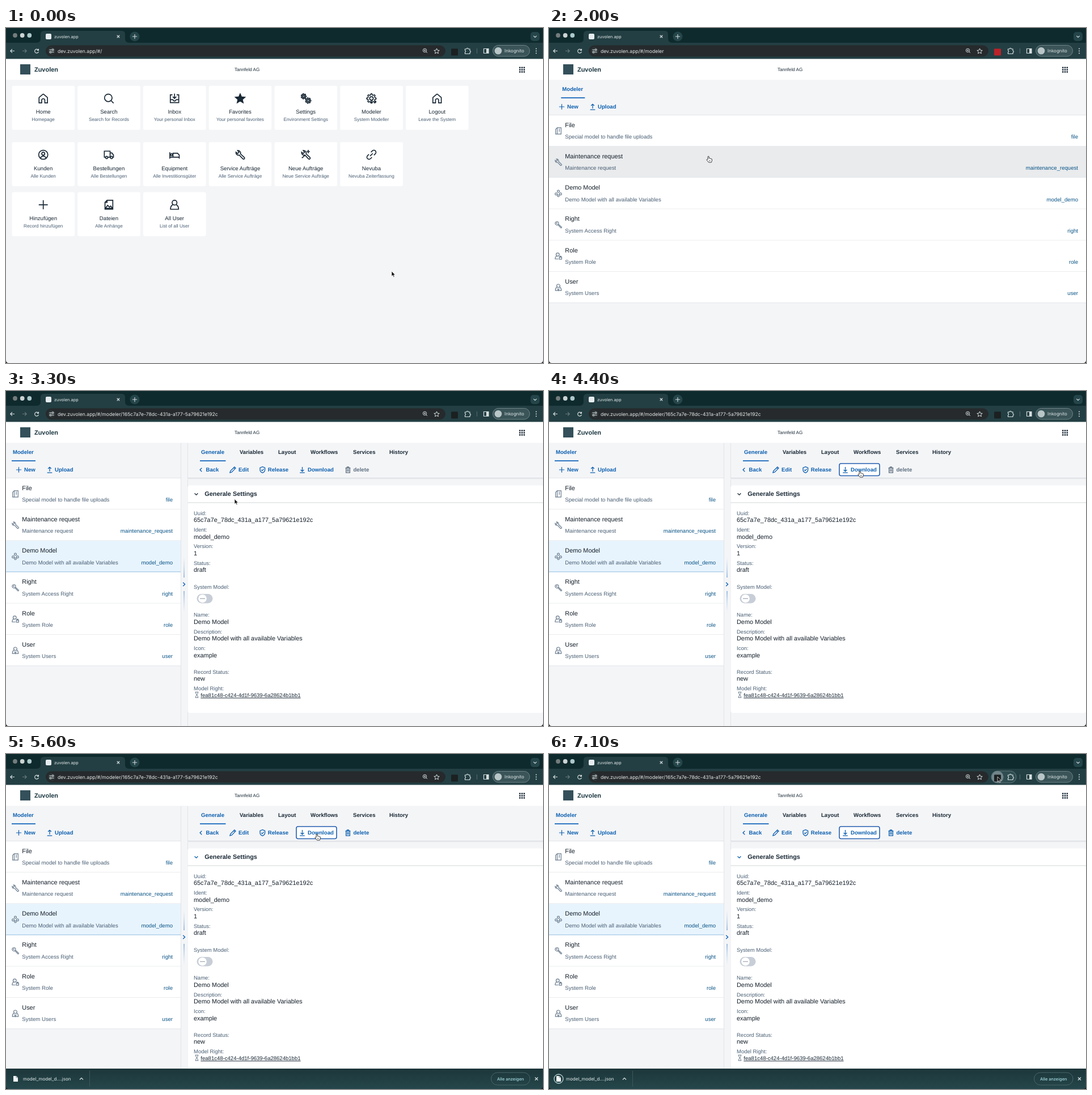
These frames come from a looping animation (947x591 px, 7200 ms). An HTML page:

```html
<!DOCTYPE html>
<html lang="de">
<head>
<meta charset="utf-8">
<title>Modeler</title>
<style>
html, body { margin: 0; width: 100%; height: 100%; overflow: hidden; background: #f4f5f7; }
svg { display: block; width: 100%; height: 100%; }
text { font-family: "Liberation Sans", Arial, sans-serif; text-rendering: geometricPrecision; white-space: pre; }
.ui { font-family: Inter, sans-serif; }
</style>
</head>
<body>
<svg id="stage" viewBox="0 0 947 591" preserveAspectRatio="none"></svg>
<script>
const LOOP = 7200, STEP = 100;
const INK = '#1a2936', BLUE = '#0d60b0', LINK = '#0a5486', GREY = '#4a5f74', PAGE = '#f4f5f7';
const stage = document.getElementById('stage');

// Drawing helpers
const rect = (x, y, w, h, fill, extra = '') =>
  `<rect x="${x}" y="${y}" width="${w}" height="${h}" fill="${fill}" ${extra}/>`;
const disc = (x, y, r, fill, extra = '') => `<circle cx="${x}" cy="${y}" r="${r}" fill="${fill}" ${extra}/>`;
const text = (s, x, y, size = 9.6, fill = INK, extra = '') =>
  `<text x="${x}" y="${y}" font-size="${size}" fill="${fill}" ${extra}>${s}</text>`;
const bold = (s, x, y, size = 9.6, fill = BLUE) => text(s, x, y, size, fill, 'font-weight="700"');
const ui = (s, x, y, size, fill, extra = '') => text(s, x, y, size, fill, 'class="ui" ' + extra);
const line = (d, color, width = 1.2, extra = '') =>
  `<path d="${d}" fill="none" stroke="${color}" stroke-width="${width}" stroke-linejoin="round" ${extra}/>`;
const ring = (x, y, r) => `M${x - r} ${y}a${r} ${r} 0 1 0 ${2 * r} 0a${r} ${r} 0 1 0 ${-2 * r} 0`;
const cog = (x, y, r, teeth) => {
  let d = ring(x, y, r * .38);
  for (let i = 0; i <= teeth * 4; i++) {
    const a = (i - .5) / teeth / 4 * Math.PI * 2, q = i % 4 < 2 ? r : r * .76;
    d += `${i ? 'L' : 'M'}${(x + q * Math.cos(a)).toFixed(2)} ${(y + q * Math.sin(a)).toFixed(2)}`;
  }
  return d;
};

// Icon outlines, centred on 0,0
const WRENCH = 'M-7-4.2A4.3 4.3 0 0 0-1.5.5L4.5 6.9A1.7 1.7 0 0 0 6.9 4.5L.5-1.5A4.3 4.3 0 0 0-4.2-7L-2-4.2-4.2-2Z';
const ICONS = {
  home: 'M-7-1.2Q-7-1.7-6.5-2.1L-.6-7Q0-7.5.6-7L6.5-2.1Q7-1.7 7-1.2V7.3H2.6V3A2.6 2.6 0 0 0-2.6 3V7.3H-7Z',
  search: ring(-1, -1, 6.3) + 'M3.5 3.5 7.8 7.8',
  inbox: 'M-3.5-6H-7V7H7V-6H3.5M-7 2H-3L-1 4H1L3 2H7M0-8V0M-3-3 0 0 3-3',
  star: 'M0-7.5 2.2-2.5 7.8-2 3.6 1.6 4.8 7 0 4.1-4.8 7-3.6 1.6-7.8-2-2.2-2.5Z',
  cogs: cog(-3.5, -3.5, 4.3, 7) + cog(4, 3.5, 4.6, 7),
  cog: cog(0, 0, 7.8, 8) + 'M1.5 3-1 5.5 1.5 8M5 3 7.5 5.5 5 8',
  account: ring(0, 0, 7.6) + ring(0, -1.8, 2.5) + 'M-4.5 6A4.6 4.6 0 0 1 4.5 6',
  truck: 'M-5.6 4H-7.6V-6H2V4H-1.8M2-3H5L7.6.5V4H6.4M2 4H2.4' + ring(-3.7, 4.6, 1.9) + ring(4.4, 4.6, 1.9),
  bed: 'M-7.8-4V6.5M-7.8 4H7.8V6.5M7.8 4V.5L5-2.5H-2.5V4' + ring(-5, 0, 1.7),
  wrench: WRENCH,
  repair: WRENCH + 'M-6.5 5.5-1.5 1M4-8V-2.5M1.3-5.3H6.8',
  link: 'M-2.2 2.2 2.2-2.2M-.8-4.2 1.6-6.5A3.4 3.4 0 0 1 6.5-1.6L4.2.8M.8 4.2-1.6 6.5A3.4 3.4 0 0 1-6.5 1.6L-4.2-.8',
  plus: 'M0-7.5V7.5M-7.5 0H7.5',
  image: 'M-3-7.5H6.5V7.5H-6.5V-4ZM-3-7.5V-4H-6.5M-6 6-2 1 1 4 3 2 6 6Z',
  user: ring(0, -3.4, 4) + 'M-3 0Q-6.7 2-6.7 7.5H6.7Q6.7 2 3 0',
  file: 'M-2.5-7H6V7H-6V-3.5ZM-2.5-7V7M2-5V2',
  model: ring(0, -4.8, 2.4) + ring(-4.8, 1, 2.4) + ring(4.8, 1, 2.4) + ring(0, 5.2, 2.1),
  key: ring(-3.2, -3.2, 3.8) + ring(-3.6, -3.6, .7) + 'M-1 .3 6 7.2 7.5 5.5.3-1',
  role: ring(-1.5, -3.3, 3.5) + 'M0 6.5H-7Q-7 1-3.5 0M2 2.5H7.3V7H2ZM3.2 2.5V.5H6V2.5',
  person: ring(0, -3.3, 3.6) + 'M-3-.5Q-6.5 1-6.5 7H6.5Q6.5 1 3-.5M-2 2 0 7 2 2',
  upload: 'M0 4V-6.5M-4-2.7 0-6.5 4-2.7M-6 7H6',
  download: 'M0-7V4M-4 0 0 4 4 0M-6 7H6',
  left: 'M2.5-4.5-2 0 2.5 4.5',
  down: 'M-4.5-2 0 2.5 4.5-2',
  pencil: 'M-7 7-5.8 2.8 4-7 7-4-2.8 5.8ZM2-5 5-2',
  shield: 'M0-7.5 6-5V0Q6 5 0 7.5-6 5-6 0V-5ZM-3 0-.6 2.3 3.4-2.2',
  trash: 'M-6-4.5H6M-2-4.5V-7H2V-4.5M-4.7-4.5V7H4.7V-4.5M-1.6-2V4.5M1.6-2V4.5',
  hourglass: 'M-4-7H4M-4 7H4M-3-7Q-3-3 0 0 3-3 3-7M-3 7Q-3 3 0 0 3 3 3 7',
  cross: 'M-3-3 3 3M3-3-3 3',
  reload: 'M4.5-2A5 5 0 1 0 5 1.5M5-5.5V-1.6H1'
};
const icon = (name, x, y, scale = 1, color = INK, width = 1.5) =>
  `<g transform="translate(${x} ${y}) scale(${scale})">` +
  `<path d="${ICONS[name]}" fill="${name === 'star' ? color : 'none'}" stroke="${color}" stroke-width="${width}"/></g>`;

const CARDS = [
  [102, [['home', 'Home', 'Homepage'], ['search', 'Search', 'Search for Records'],
    ['inbox', 'Inbox', 'Your personal Inbox'], ['star', 'Favorites', 'Your personal favorites'],
    ['cogs', 'Settings', 'Environment Settings'], ['cog', 'Modeler', 'System Modeller'],
    ['home', 'Logout', 'Leave the System']]],
  [201.3, [['account', 'Kunden', 'Alle Kunden'], ['truck', 'Bestellungen', 'Alle Bestellungen'],
    ['bed', 'Equipment', 'Alle Investitionsgüter'], ['wrench', 'Service Aufträge', 'Alle Service Aufträge'],
    ['repair', 'Neue Aufträge', 'Neue Service Aufträge'], ['link', 'Nevuba', 'Nevuba Zeiterfassung']]],
  [289.5, [['plus', 'Hinzufügen', 'Record hinzufügen'], ['image', 'Dateien', 'Alle Anhänge'],
    ['user', 'All User', 'List of all User']]]
];
const MODELS = [
  ['file', 'File', 'Special model to handle file uploads', 'file'],
  ['wrench', 'Maintenance request', 'Maintenance request', 'maintenance_request'],
  ['model', 'Demo Model', 'Demo Model with all available Variables', 'model_demo'],
  ['key', 'Right', 'System Access Right', 'right'],
  ['role', 'Role', 'System Role', 'role'],
  ['person', 'User', 'System Users', 'user']
];
const FIELDS = [
  [215, 'Uuid:', '65c7a7e_78dc_431a_a177_5a79621e192c'], [244.5, 'Ident:', 'model_demo'],
  [273.7, 'Version:', '1'], [303, 'Status:', 'draft'], [345, 'System Model:', ''],
  [394.5, 'Name:', 'Demo Model'], [424, 'Description:', 'Demo Model with all available Variables'],
  [453.3, 'Icon:', 'example'], [495, 'Record Status:', 'new'], [524.3, 'Model Right:', '']
];

function browser(t) {
  const pale = '#d5dddd', hover = t >= 6900, alert = t >= 1000 && t < 2700;
  const path = t < 900 ? '' : t < 2700 ? 'modeler' : 'modeler/165c7a7e-78dc-431a-a177-5a79621e192c';
  let s = rect(0, 0, 947, 27, '#0f2a2d') + rect(0, 26, 947, 29, '#233f43') +
    '<path d="M54 26Q61 26 61 19V11Q61 5 67 5H204Q210 5 210 11V19Q210 26 217 26Z" fill="#233f43"/>' +
    disc(16, 13, 3.9, '#747c7d') + disc(28.7, 13, 3.9, '#ccd3d3') + disc(41.3, 13, 3.9, '#adc8ca') +
    rect(70, 10, 10, 10, '#e6ecee', 'rx="2"') + ui('zuvolen.app', 85, 17.8, 7.4, '#e3e9e9') +
    icon('cross', 198, 15, .75, pale) + disc(227, 15, 8.5, '#24454a') + icon('plus', 227, 15, .55, pale, 2) +
    rect(925, 7, 16, 16, '#24454a', 'rx="5"') + icon('down', 933, 15, .6, pale, 2) +
    rect(70, 30.5, 705, 20, '#262a2c', 'rx="10"') +
    line('M15 40.5H8M11 37.3 7.8 40.5 11 43.7', pale) + line('M29 40.5H36M33 37.3 36.2 40.5 33 43.7', '#68797c') +
    icon('reload', 54, 40.5, .68, pale, 1.8) + disc(80.5, 40.5, 6.5, '#30383a') +
    line('M76.5 38.5H80M84.5 42.5H81' + ring(82.5, 38.5, 1.5) + ring(78.5, 42.5, 1.5), pale, 1.2) +
    ui('dev.zuvolen.app/#/' + path, 91, 43.8, 8.6, '#e6e9e9') +
    icon('search', 739, 40, .5, pale, 2) + line('M736.7 39.5H740.3M738.5 37.7V41.3', pale, .8) +
    line('M759.5 36 760.8 39.2 764.2 39.5 761.6 41.8 762.4 45 759.5 43.3 756.6 45 757.4 41.8 754.8 39.5 758.2 39.2Z', pale, 1);
  if (hover) s += rect(780, 30, 44, 21, '#2f4d51', 'rx="10.5" stroke="#60777a"') + disc(791, 40.5, 10.5, '#71858a');
  return s + rect(785, 36.5, 12, 12, alert ? '#bd2229' : '#1b2021', 'rx="1"') +
    line('M809.5 37H812A1.8 1.8 0 0 1 815.5 37H818V40A1.8 1.8 0 0 1 818 43.5V45.5H809.5V42.8A1.8 1.8 0 0 0 809.5 39.5Z', pale, 1.2) +
    line('M830.5 36V45', '#56696c', 1) + line('M842.5 36.5H851V44.5H842.5Z', pale) + rect(847, 36.5, 4, 8, pale) +
    rect(858.5, 30.5, 65, 19.5, '#3a5458', 'rx="9.8" stroke="#6f8588"') + disc(868, 40.3, 6.3, '#b9c6c7') +
    ui('Inkognito', 879, 43.3, 8, '#dce4e4') +
    [36.5, 40.5, 44.5].map(y => disc(935, y, 1, pale)).join('');
}

function header() {
  let s = rect(0, 54.5, 947, 37, '#fff') + rect(25, 64, 18, 18, '#34505a') +
    bold('Zuvolen', 50, 76.8, 10.95, '#1b3640') + text('Tannfeld AG', 403, 75.8, 8.15);
  for (let i = 0; i < 9; i++) s += rect(905 + i % 3 * 3.8, 68.6 + (i / 3 | 0) * 3.8, 2.5, 2.5, INK);
  return s;
}

function home(t) {
  return CARDS.map(([y, row]) => row.map(([name, title, sub], i) => {
    const x = 10.5 + 115.75 * i, mid = x + 55.2, centre = 'text-anchor="middle"';
    const fill = title === 'Modeler' && t >= 500 ? '#eceef1' : '#fff';
    return rect(x, y, 110.6, 77.7, fill, 'rx="3"') + icon(name, mid, y + 22.3, 1.06, INK, 1.6) +
      text(title, mid, y + 49.2, 9.65, INK, centre) + text(sub, mid, y + 62.2, 8.25, GREY, centre);
  }).join('')).join('');
}

function rowColor(i, t) {
  if (i === 1 && t >= 1900 && t < 2400) return '#e9ebed';
  if (i !== 2 || t < 2400) return '#fff';
  return t < 2700 ? '#e9ebed' : t < 2900 ? '#dde1e5' : t < 3200 ? '#d8ebf9' : '#e8f4fd';
}

function list(t) {
  const open = t >= 2900, width = open ? 308 : 947, tab = open ? 12 : 23.3;
  let s = bold('Modeler', tab, 111.3) + rect(tab - 2, 122.3, 42, 1.8, '#1567bd') +
    icon('plus', 22.5, 139, .62, BLUE, 2) + bold('New', 32, 142.3) +
    icon('upload', 77, 139, .72, BLUE, 1.8) + bold('Upload', 86, 142.3) + rect(0, 153, width, 1, '#d9dde1');
  MODELS.forEach(([name, title, sub, id], i) => {
    const y = 153.8 + 55.2 * i, active = i === 2 && t >= 2700 && !open;
    s += rect(0, y, width, 55.2, rowColor(i, t)) +
      rect(0, y + 54.5, width, 1, open && i === 2 ? '#4c93c8' : '#e2e5e8') +
      icon(name, 16.5, y + 27.7, .8, active ? '#131e29' : '#6a7c8e', 1.5) +
      text(title, 28.3, y + 21, 10.9, '#131e29') +
      text(sub, 28.3, y + 41.4, 9.65, active ? '#131e29' : GREY) +
      text(id, open ? 294 : 933, y + 41.4, 9.6, active ? '#131e29' : LINK, 'text-anchor="end"');
    if (active) s += rect(1, y + 1.7, 944.5, 51.6, 'none', 'stroke="#2e6fd2" stroke-width="1.6"');
  });
  return s;
}

function detail(t) {
  const mid = t < 4700 ? 341 : 323, focus = t >= 4300, late = t >= 5000;
  const tabs = [['Variables', 412], ['Layout', 480], ['Workflows', 537], ['Services', 612], ['History', 676]];
  const bar = late ? BLUE : '#5d6f80';
  let s = rect(308, 91.5, 12, 500, PAGE) + line('M308.5 92V591M320.5 92V591', '#e1e4e8', 1) +
    rect(313.4, mid - 48, 1.2, 36, 'url(#fadeUp)') + rect(313.4, mid + 12, 1.2, 38, 'url(#fadeDown)') +
    line(`M312.2 ${mid - 3.2} 315.6 ${mid} 312.2 ${mid + 3.2}`, '#1567bd', 1.5) +
    bold('Generale', 344, 111.3) + rect(342, 122.3, 45.5, 1.8, '#1567bd') +
    tabs.map(([name, x]) => bold(name, x, 111.3, 9.6, INK)).join('') +
    rect(320, 153, 627, 1, '#d5d9de') + rect(320, 154, 627, 2, '#eceef1') +
    (focus ? rect(512, 128, 71, 21.5, '#fff', 'rx="3" stroke="#245fb0" stroke-width="1.6"') : '') +
    [['left', 343.5, 'Back', 352.5], ['pencil', 400, 'Edit', 410], ['shield', 452.3, 'Release', 461.8],
      ['download', 522.5, 'Download', 532], ['trash', 603, 'delete', 612.5]].map(([name, ix, label, x]) => {
      const color = label === 'delete' ? bar : BLUE;
      return icon(name, ix, 139, .72, color, 1.8) + bold(label, x, 142.3, 9.6, color);
    }).join('') +
    rect(320.5, 166.5, 627, 401.5, '#fff', 'rx="4"') + rect(320.5, 196.5, 627, 1, '#d0d5da') +
    icon('down', 335.5, 181.8, .65, late ? BLUE : INK, 2) + bold('Generale Settings', 350.3, 185.4, 10.9, INK);
  for (const [y, label, value] of FIELDS)
    s += text(label, 331, y + 3.6, 9.5, GREY) + text(value, 331, y + 16.4, 10.9, '#131e29');
  return s + rect(336.5, 358, 28, 16.5, '#c8ced7', 'rx="8.2"') + disc(346.5, 366.2, 7.3, '#fff') +
    line('M342 366.2H351', '#9aa5b1', 1.2) + icon('hourglass', 336.5, 536, .7, GREY, 1.2) +
    text('fea81c48-c424-4d1f-9639-6a28624b1bb1', 343.3, 540.2, 9.55, INK, 'text-decoration="underline"');
}

function downloads(t) {
  const pulse = .5 - .5 * Math.cos((t - 4600) / 1000 * Math.PI * 2), pale = '#d5dddd';
  return rect(0, 555, 947, 36, 'url(#shelf)') +
    disc(17, 573, 8, 'none', `stroke="#b9d3d6" stroke-width="1.3" opacity="${pulse.toFixed(2)}"`) +
    '<path d="M13 568H18L21 571V578H13Z" fill="#f3f6f6"/>' + line('M18 568V571H21', '#6d8083', .8) +
    ui('model_model_d....json', 30, 576.3, 8.05, '#dfe6e6') +
    line('M130 574.5 133 571.5 136 574.5', pale) + rect(147, 559, 1, 28, '#3e575b') +
    rect(855.5, 562, 68.5, 22, 'none', 'rx="11" stroke="#49666a"') +
    ui('Alle anzeigen', 889.7, 575.5, 7.4, '#a5dbe2', 'text-anchor="middle" font-weight="500"') +
    icon('cross', 935.5, 573, .85, pale);
}

// Pointer stops: time, x, y
const STOPS = [[0, 680, 429], [200, 680, 429], [600, 662, 146], [1600, 662, 146], [2000, 281, 226],
  [2100, 279, 227], [2200, 279, 227], [2600, 163, 280], [3100, 163, 280], [3400, 487, 159], [3600, 487, 159],
  [4200, 548, 141], [6100, 548, 141], [6900, 791, 40], [7200, 791, 40]];

function pointer(t) {
  const i = STOPS.findIndex(s => s[0] > t), [t0, x0, y0] = STOPS[i - 1], [t1, x1, y1] = STOPS[i];
  const p = (t - t0) / (t1 - t0), e = p * p * (3 - 2 * p);
  const x = x0 + (x1 - x0) * e, y = y0 + (y1 - y0) * e;
  const hand = t >= 500 && t < 900 || t >= 1800 && t < 3200 || t >= 4000 && t < 6300;
  const shape = hand
    ? '<path d="M-.9 6V.9Q.2-.5 1.2.9V4Q2.5 3.2 3 4.3 4.3 3.7 4.7 4.8 6.4 4.4 6.4 6.2V8Q6 9.4 5.3 11H.5Q-1 9-3.2 6.6-2.7 5-.9 6Z" fill="#fff" stroke="#222" stroke-width=".9" stroke-linejoin="round"/><path d="M1.5 7V9.2M3.2 7V9.2" stroke="#222" stroke-width=".6"/>'
    : '<path d="M0 0V9L2.1 7.2 3.6 10.4 5.1 9.7 3.7 6.7H6.4Z" fill="#111" stroke="#fff" stroke-width=".7"/>';
  return `<g transform="translate(${x.toFixed(1)} ${y.toFixed(1)})">${shape}</g>`;
}

const gradient = (id, from, to) => `<linearGradient id="${id}" x2="0" y2="1"><stop stop-color="${from}"/>` +
  `<stop offset="1" stop-color="${to}"/></linearGradient>`;
const DEFS = '<defs>' + gradient('fadeUp', '#9cc0e600', '#5c97d6') + gradient('fadeDown', '#5c97d6', '#9cc0e600') +
  gradient('shelf', '#1d363a', '#25474b') + '</defs>';
const CORNERS = '<path d="M0 586V591H5Q0 591 0 586ZM947 586V591H942Q947 591 947 586Z" fill="#111"/>';

function scene(t) {
  return DEFS + rect(0, 0, 947, 591, PAGE) + browser(t) + header() + (t < 900 ? home(t) : list(t)) +
    (t >= 2900 ? detail(t) : '') + (t >= 4700 ? downloads(t) : '') + CORNERS + pointer(t);
}

const start = performance.now();
let shown = -1;
function tick() {
  const t = Math.floor((performance.now() - start) % LOOP / STEP) * STEP;
  if (t !== shown) stage.innerHTML = scene(shown = t);
  requestAnimationFrame(tick);
}
tick();
</script>
</body>
</html>
```
